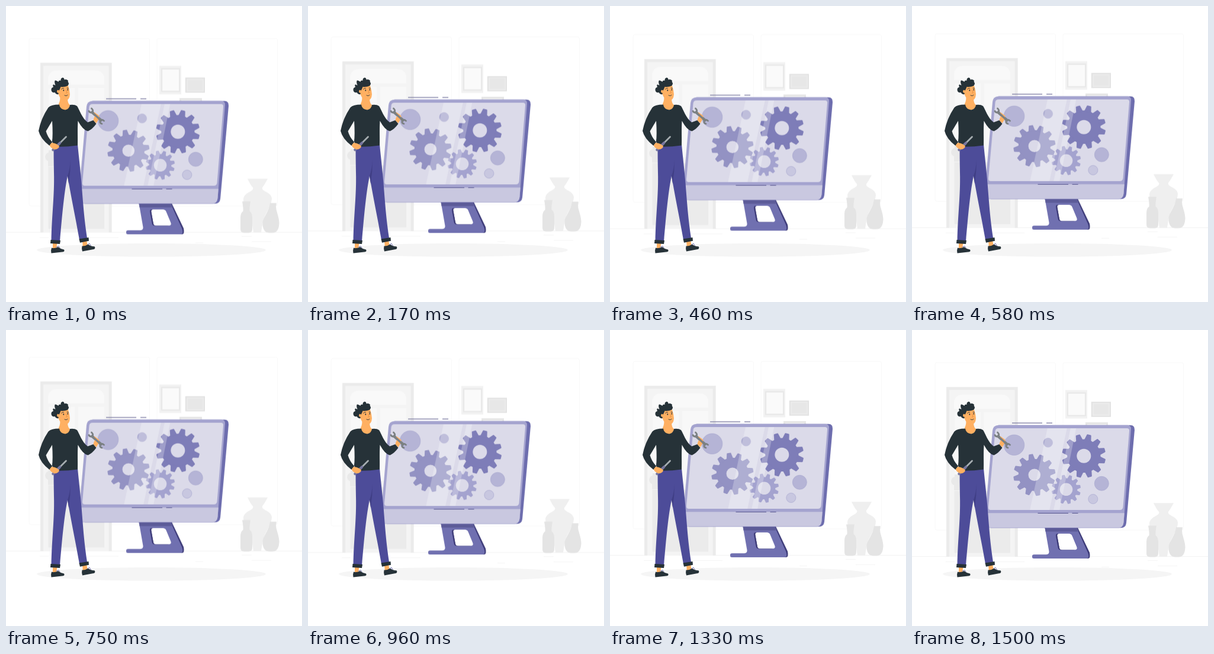
An HTML page without scripts that plays this animation: 500 by 500 pixels, repeating every 1.54 s.

```html
<!DOCTYPE html>
<html lang="en">
<head>
<meta charset="utf-8">
<title>Floating computer repair</title>
<style>
  html, body { margin: 0; width: 100%; height: 100%; overflow: hidden; background: #fff; }
  svg { display: block; width: 100%; height: 100%; }
  /* 24 pictures per second: 17 steps up, 19 steps down */
  .float { animation: float 1540ms -4ms infinite; }
  @keyframes float {
    0% { transform: translateY(-.4px); animation-timing-function: steps(17); }
    45.946% { transform: translateY(-9.9px); animation-timing-function: steps(19); }
    97.297%, 100% { transform: translateY(0); }
  }
  .skin { fill: #ffb062; }
  .dark { fill: #263238; }
  .pants { fill: #4d4c99; }
  .line { fill: none; stroke-linecap: round; stroke-linejoin: round; }
</style>
</head>
<body>
<svg viewBox="0 0 500 500">
  <defs>
    <path id="tooth" d="M26-6 36-3.800Q37-3.600 37-2.600V2.600Q37 3.600 36 3.800L26 6z"/>
    <g id="quarter">
      <use href="#tooth"/>
      <use href="#tooth" transform="rotate(30)"/>
      <use href="#tooth" transform="rotate(60)"/>
    </g>
    <g id="half">
      <use href="#quarter"/>
      <use href="#quarter" transform="rotate(90)"/>
    </g>
    <g id="gear">
      <circle r="28.200"/>
      <use href="#half"/>
      <use href="#half" transform="rotate(180)"/>
    </g>
    <path id="screen" d="M146 166H363Q367.500 166 367 170.500L356.500 299Q356 304 351 304H133Q128.500 304 129 299L140.500 171Q141 166 146 166z"/>
    <path id="hole" d="M246 344Q242.500 344 243 348L246.500 367.500Q247 371.500 251 371.500H273Q278 371 276 366L268.500 348Q267 344 263 344z"/>
    <clipPath id="inScreen"><use href="#screen"/></clipPath>
    <clipPath id="inHole"><use href="#hole"/></clipPath>
  </defs>

  <ellipse cx="245.500" cy="412.300" rx="193.500" ry="11.300" fill="#f5f5f5"/>

  <g class="float">
    <!-- room -->
    <g fill="none" stroke="#f8f8f8">
      <rect x="39" y="55" width="203.500" height="283" rx="3"/>
      <rect x="255" y="55" width="203.500" height="283" rx="3"/>
    </g>
    <path d="M0 382.700H500" stroke="#f2f2f2"/>
    <path d="M57 391.500H72M140 391.500H190M398 389.500H415M415 398.500H448M320 400.500H333" stroke="#f5f5f5"/>

    <!-- door -->
    <path d="M58 96.300H178.700V383H58z" fill="#ebebeb"/>
    <path d="M63 101.300H173.700V383H63z" fill="#f4f4f4"/>
    <path d="M71 133.500V121Q73 109 87 109H150Q164 109 166 121V133.500z" fill="#f9f9f9"/>
    <path d="M72 138.500H116V262H72zM121.500 138.500H166V262H121.500z" fill="#f8f8f8"/>
    <path d="M71.500 272H166V376.500H71.500z" fill="#ebebeb"/>
    <path d="M66 255Q67 249 72 248V244H81V271H71V262Q67 261 66 255z" fill="#e9e9e9"/>

    <!-- frames -->
    <path d="M259 101.500H296V149.500H259z" fill="#f2f2f2"/>
    <rect x="263" y="106.500" width="30" height="38" fill="#fafafa" stroke="#e8e8e8" stroke-width="2"/>
    <path d="M302.800 121.300H336V146.800H302.800z" fill="#e2e2e2"/>
    <rect x="306" y="124.300" width="27" height="19.500" fill="#e7e7e7" stroke="#ebebeb" stroke-width="2.500"/>
    <path d="M293 156H331V166H293z" fill="#e6e6e6"/>
    <path d="M296 159H328V166H296z" fill="#f2f2f2"/>

    <!-- vases -->
    <path d="M408 292.300H442Q437 302 433 307C431 314 447 314 449 325C449 340 435 352 433 370L431 383H418L416 370C415 354 401 345 401 326C403 314 420 314 417 307Q413 303 408 292.300z" fill="#efefef"/>
    <path d="M399 330.500H413Q411 341 411.500 347Q416 350 416 358V377Q416 383.500 410 383.500H402Q396 383.500 396 377V358Q396 350 400.500 347Q401 341 399 330.500z" fill="#e4e4e4"/>
    <path d="M446 333.300H457Q455.500 339 456.500 344C459 353 461.500 360 461.500 367Q461 383.500 450 383.500H445Q433.500 383.500 433.300 367C433 359 445 347 446 333.300z" fill="#e4e4e4"/>

    <!-- stand -->
    <path d="M226 334H280L300 376Q302 386 297 386H290z" fill="#3d3b78"/>
    <path d="M224.500 334H278L297.500 377Q300 386 295 386H206Q203 386 203 383.500V382Q203 379.300 206 379.300H227Q232 379 231.500 374z" fill="#7070b0"/>
    <use href="#hole" fill="#3d3b78"/>
    <use href="#hole" x="2.300" clip-path="url(#inHole)" fill="#fff"/>
    <path d="M224.500 334H279L282 340.500H225.500z" fill="#5c5b98"/>

    <!-- monitor -->
    <path d="M146 160.800H369Q376.500 161 376 169L362 326Q361 334.300 353 334.300H133z" fill="#6d6dae"/>
    <path d="M146 160.800H364Q370.500 161 370 168L357.500 325Q356.500 334.300 349 334.300H128Q122 334.300 122.500 328L136 170Q137 161 146 160.800z" fill="#a4a3cf"/>
    <path d="M124 309.300H358.700L357.500 325Q356.500 333.800 349 333.800H128Q122 334 122.500 328z" fill="#c9c8e0"/>
    <use href="#screen" fill="#dbdae9"/>
    <path d="M169 157.200H220M227 157.200H237" stroke="#77769e" stroke-width="1.200"/>
    <path d="M212.500 309.500H264M270.500 309.500H280.500" stroke="#57568f" stroke-width="1.200"/>

    <g fill="#b5b4d6" stroke="#aaa9d0" stroke-width=".7">
      <circle cx="172.500" cy="194.300" r="17.300"/>
      <circle cx="229.800" cy="190.300" r="7.800" fill="#a9a8cf"/>
      <circle cx="320.300" cy="259.300" r="12"/>
      <circle cx="305.800" cy="285.500" r="8" fill="#c8c7e0"/>
    </g>
    <use href="#gear" transform="translate(290.300 212.800) rotate(14)" fill="#7e7db8"/>
    <use href="#gear" transform="translate(206.800 244.800) rotate(20) scale(.96)" fill="#9392c3"/>
    <use href="#gear" transform="translate(260.500 269.300) rotate(18) scale(.665)" fill="#a4a3cf"/>
    <g fill="#dbdae9">
      <circle cx="290.300" cy="212.800" r="12"/>
      <circle cx="206.800" cy="244.800" r="10.300"/>
      <circle cx="260.500" cy="269.300" r="10.800"/>
    </g>
    <path clip-path="url(#inScreen)" d="M229 165H262L232 305H199zM268 165H277.500L249 305H239z" fill="#fff" opacity=".25"/>
  </g>

  <!-- legs -->
  <path class="skin" d="M79 399H86.500L85 411H79zM129 397 136 395.500 138 406 130 409z"/>
  <path class="dark" d="M77 408.500Q83 410 88 407Q92 410.500 98 411.500Q99.500 414 97 415.300L76.500 417.500Q75.500 412 77 408.500zM128.500 405.500Q134 406 138.500 402.500Q143 406 149.500 406.300Q151.500 409 149 410.800L129 414.500Q127.500 409 128.500 405.500z"/>
  <path class="line" d="M85 407 89 405.500 91 408.500M138 403 141 401 143 404.500" stroke="#7b7ab5" stroke-width="1"/>
  <path class="pants" d="M80.500 234H121C123 255 126 280 127.500 299C130 330 132 360 137 392L124 395C117 355 109 318 104 287C99 310 95 350 91 398H76.500C77.500 350 82 320 81 282Q80.500 255 80.500 234z"/>
  <path d="M109 260Q108 276 104 287L106 300Q109 280 109 260z" fill="#403f86"/>
  <path class="dark" d="M75.500 395 92 396 91 402 75 401zM123.500 393.500 139.500 391 140 396.800 125 399.800z"/>

  <!-- head -->
  <path class="skin" d="M91 147Q92.500 159 89 165Q88 175 99 176Q108 175 108 167Q104.500 165 104 157z"/>
  <path class="skin" d="M86 138Q94 131 105 134.500Q107.500 142 108 149Q107.500 159.500 99.500 160Q92 159 88.500 149Q83 147 86 138z"/>
  <path class="dark" d="M88 149.500Q84 149 82.500 146Q77 147 76.500 142Q76 138 80 137Q78.500 134 80 132.500L83.500 134Q81 128 83 125.500Q86 126 88.500 128Q89 125 92.500 126Q92 122 95.500 121Q98.500 121 98.500 124.500Q102 123 105 126Q104 127.500 105.500 129.500Q107 131.500 104 135Q98 137.500 92.500 136.500Q91 141 89.500 143Q87 140 86 144Q86 147 89 147z"/>
  <ellipse class="dark" cx="97.300" cy="142.500" rx=".9" ry="1.300"/>
  <ellipse class="dark" cx="104.300" cy="141.500" rx=".8" ry="1.200"/>
  <path class="line" d="M93.500 140.500Q95 138.500 97.500 139M103 138.500 105.500 139M99 151Q102 153 104 150.500" stroke="#263238" stroke-width=".9"/>
  <path class="line" d="M101.500 142 103.300 146.500 101.500 147" stroke="#e58a3c" stroke-width=".8"/>

  <!-- sweater -->
  <path class="dark" fill-rule="evenodd" d="M90 166.500Q91 174.500 100 175.500Q107 174 108 167Q116 166 120 169C124 175 128 189 138 196.500L147.500 193 152.500 199Q146 208 138.500 211.500Q130 210 121.500 194C120.500 210 121.500 224 121 235.500Q100 238.500 79.500 237.500L78.500 229.500 73.500 236Q58 224 55 211Q59 190 71.500 171.500Q76 166.500 90 166.500zM78 194 67.500 211.500Q70 221 77.800 229.500Q79.500 218 78 194z"/>

  <!-- wrench and hand -->
  <g class="line" stroke="#7b8083">
    <path d="M145.500 179.500 160.500 193" stroke-width="4.500"/>
    <path d="M140 177.500Q142 181 146 179.500Q148 176 144.500 173M165.500 194Q161.500 190.500 159 194Q158 198 162 199" stroke-width="2.800"/>
  </g>
  <path class="skin" d="M147.500 193Q148 190 150 186L148 181Q149 178.500 151.500 181L157 185Q158.500 189 156 192L152.500 198z"/>
  <path class="line" d="M147 181 158 191" stroke="#7b8083" stroke-width="3.500"/>

  <!-- screwdriver and hand -->
  <path class="line" d="M89 233.500 101.500 221" stroke="#a6adb0" stroke-width="2.800"/>
  <path class="line" d="M79.500 243 91 231.500" stroke="#77769f" stroke-width="4.500"/>
  <path class="skin" d="M73.500 235.500 77 231Q82 231.500 85 233L89.500 236Q90.500 239 87 241Q83 243.500 79 241Q75 239 73.500 235.500z"/>
</svg>
</body>
</html>
```
